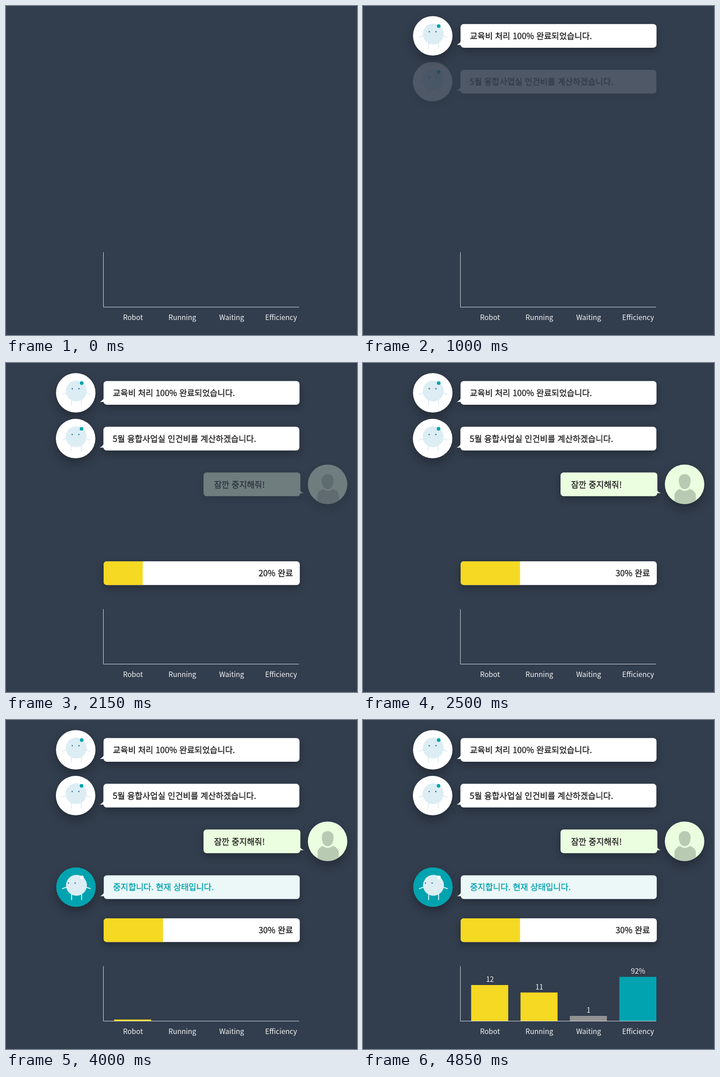
Write an HTML page that moves like this. It is 773 px wide and 725 px high and loops after 5.35 s.

```html
<!DOCTYPE html>
<html lang="ko">
<head>
<meta charset="utf-8">
<style>
html, body { margin: 0; width: 100%; height: 100%; overflow: hidden; background: #323d4d; }
svg { display: block; font-family: "Noto Sans CJK KR", "Noto Sans CJK JP", "Noto Sans CJK", "Noto Sans", sans-serif; }
.disc { filter: drop-shadow(0 10px 10px rgba(0, 0, 0, .28)); }
.bubble { filter: drop-shadow(0 6px 8px rgba(0, 0, 0, .28)); }
.msg text { font-size: 18.25px; fill: #222; stroke: #222; stroke-width: .4px; }
.chart text { font-size: 15.6px; fill: #f4f6f8; text-anchor: middle; }
</style>
</head>
<body>
<svg width="773" height="725" viewBox="0 0 773 725"></svg>
<script>
const LOOP = 5350, TICK = 50, FADE = 175, GROW = 200;
const TEAL = '#00a3af', YELLOW = '#f5d922', GREEN = '#ebfee0', BASE = 664;
const svg = document.querySelector('svg');

// [text, x shift, centre y, fade start, bubble, text colour, avatar, limbs, badge, eye shift]
const white = ['#fff', '#222', '#fff', '#dcedf4', TEAL, 0];
const messages = [
  ['교육비 처리 100% 완료되었습니다.', 0, 65.7, 475, ...white],
  ['5월 융합사업실 인건비를 계산하겠습니다.', -.3, 166.6, 975, ...white],
  ['중지합니다. 현재 상태입니다.', .5, 368.3, 2975, '#ecf7f8', TEAL, TEAL, '#fff', '#fff', -9]
];

// [name, value, centre x, top, colour, start]
const bars = [
  ['Robot', '12', 279, 584, YELLOW, 3990],
  ['Running', '11', 387.7, 600.5, YELLOW, 4140],
  ['Waiting', '1', 496.3, 652, '#929292', 4290],
  ['Efficiency', '92%', 605.3, 566, TEAL, 4490]
];

const robotMessage = ([text, x, y, start, bubble, ink, disc, limbs, badge, look]) => `
  <g class="msg" data-start="${start}" transform="translate(${x} ${y})">
    <circle class="disc" cx="153.6" r="43.5" fill="${disc}"/>
    <path d="M133 0L123 3.5M176 0L186 3.5M144 15V28.5M166 15V28.5" stroke="${limbs}" stroke-width="1.8"/>
    <circle cx="154.7" cy="-4" r="23" fill="#dcedf4"/>
    <circle cx="${146 + look}" cy="-9" r="1.6" fill="#3d7fa6"/>
    <circle cx="${160.7 + look}" cy="-9" r="1.6" fill="#3d7fa6"/>
    <circle cx="166.7" cy="-21.5" r="4" fill="${badge}"/>
    <g class="bubble" fill="${bubble}">
      <path d="M216 11Q213 17 206.5 20H218z"/>
      <rect x="214.8" y="-26" width="431.6" height="52.2" rx="7"/>
    </g>
    <text x="235.3" y="7" style="fill:${ink};stroke:${ink}">${text}</text>
  </g>`;

const userMessage = `
  <g class="msg" data-start="2092">
    <circle class="disc" cx="708.2" cy="267.3" r="43.5" fill="${GREEN}"/>
    <path d="M695.5 259C695 240 722 240 721.5 259C721 270 717 278 708.5 278C700 278 696 270 695.5 259z
      M686 304.8V291Q687 282 697.5 277.5Q708.5 286 720 277.5Q732 282 733 291V302.9A43.5 43.5 0 0 1 686 304.8z" fill="#b9cab2"/>
    <g class="bubble" fill="${GREEN}">
      <path d="M647 279Q650 285 656 287H645z"/>
      <rect x="435" y="241.3" width="213.3" height="52.2" rx="7"/>
    </g>
    <text x="458.3" y="274.5">잠깐 중지해줘!</text>
  </g>`;

const progress = `
  <clipPath id="track"><rect x="215" y="437" width="432" height="52.2" rx="7"/></clipPath>
  <g class="msg" data-start="1475">
    <rect class="bubble" x="215" y="437" width="432" height="52.2" rx="7" fill="#fff"/>
    <g clip-path="url(#track)"><rect id="fill" x="215" y="437" height="53" fill="${YELLOW}"/></g>
    <text id="percent" x="632" y="470" text-anchor="end"></text>
  </g>`;

const barMarkup = ([name, value, x, top, colour, start]) => `
  <rect class="bar" x="${x - 40.8}" width="81.6" fill="${colour}"/>
  <text data-start="${start + GROW - 15}" x="${x + .6}" y="${top - 7}">${value}</text>
  <text x="${x + .6}" y="692">${name}</text>`;

svg.innerHTML = messages.map(robotMessage).join('') + userMessage + progress + `
  <g class="chart">${bars.map(barMarkup).join('')}
    <path d="M214.5 542.5V663.5H645.3" fill="none" stroke="#dfe3e7"/>
  </g>`;

const fading = svg.querySelectorAll('[data-start]');
const barRects = svg.querySelectorAll('.bar');
const fill = svg.querySelector('#fill');
const percent = svg.querySelector('#percent');
const ramp = (t, start, length) => Math.min(1, Math.max(0, (t - start) / length));

function draw(t) {
  for (const el of fading) el.style.opacity = ramp(t, +el.dataset.start, FADE);

  const done = 30 * ramp(t, 1475, 1025);
  fill.setAttribute('width', done * 4.36);
  percent.textContent = Math.ceil(done) + '% 완료';
  percent.style.opacity = ramp(t, 1450, FADE);

  bars.forEach(([, , , top, , start], i) => {
    const height = (BASE - top) * ramp(t, start, GROW);
    barRects[i].setAttribute('y', BASE - height);
    barRects[i].setAttribute('height', height);
  });
}

const begin = performance.now();
function tick() {
  const t = (performance.now() - begin) % LOOP;
  draw(Math.floor(t / TICK) * TICK);
  requestAnimationFrame(tick);
}
tick();
</script>
</body>
</html>
```
